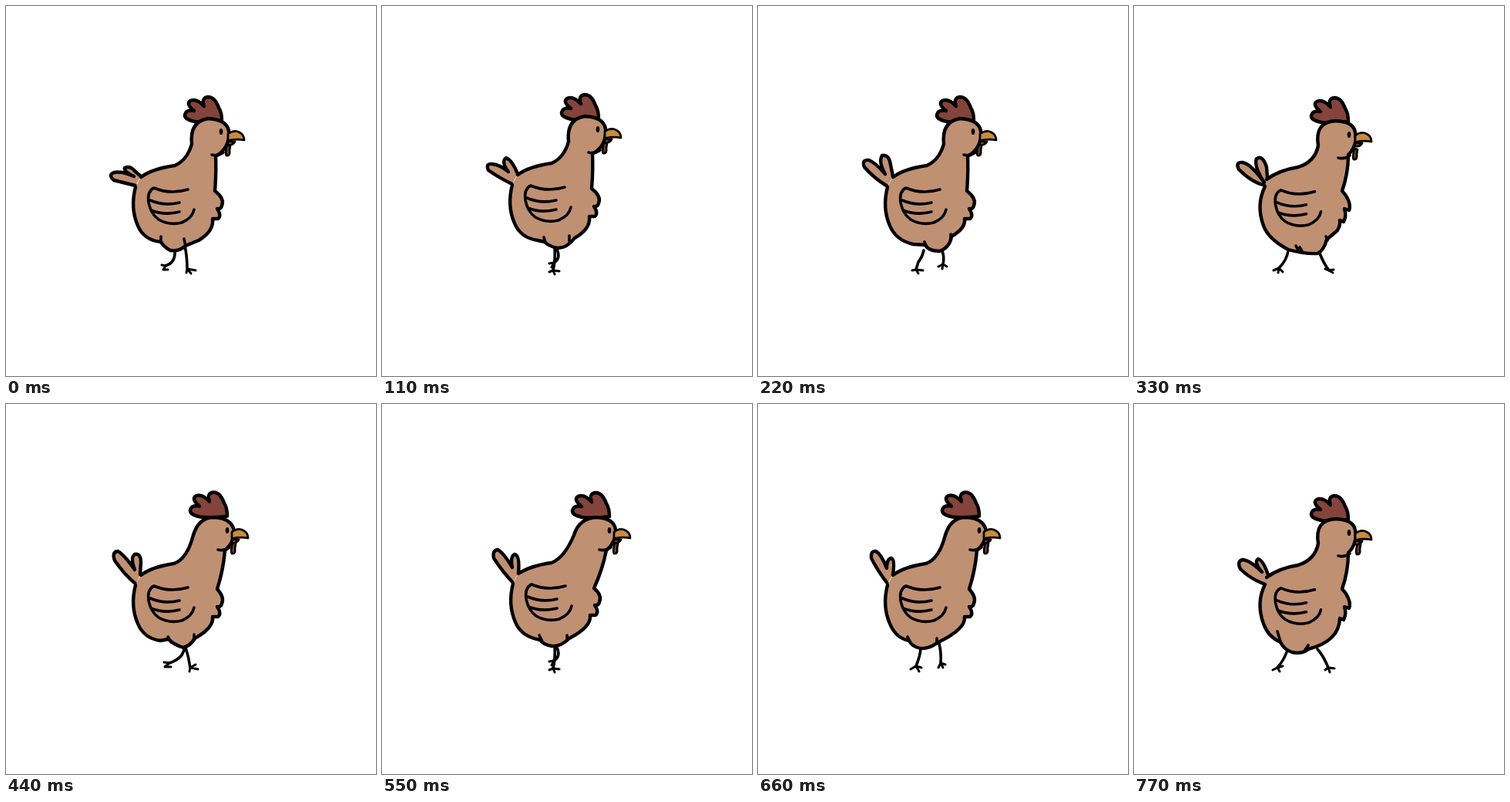
An HTML page that plays this animation: 480 by 480 pixels, repeating every 0.88 s.

```html
<!DOCTYPE html>
<html lang="en">
<head>
<meta charset="utf-8">
<title>Walking hen</title>
<style>
  html, body { margin: 0; width: 100%; height: 100%; overflow: hidden; background: #fff; }
  svg { display: block; width: 100%; height: 100%; }
  path { stroke: #000; stroke-width: 4.4; stroke-linecap: round; stroke-linejoin: round; fill: none; }
  .skin { fill: #c09073; }
  .comb { fill: #84443b; }
  .beak { fill: #ca8b3e; stroke-width: 2.8; }
  .wattle { fill: #86452f; stroke-width: 2.8; }
  .wing, .chin, .ticks, .leg { stroke-width: 3.6; }
  .toes { stroke-width: 3; }
  .pose { visibility: hidden; animation: show 880ms step-end infinite; }
  @keyframes show {
    0% { visibility: visible; }
    12.5%, 100% { visibility: hidden; }
  }
</style>
</head>
<body>
<svg id="stage" viewBox="0 0 480 480"></svg>
<script>
const path = (cls, d, x = 0, y = 0) =>
  `<path class="${cls}" d="${d}" transform="translate(${x} ${y})"/>`;

// Back, neck and head outlines, with offsets for the parts of the face.
const heads = {
  back: {
    line: 'M175 222Q190 211 219 207Q235 200 241 179Q238 150 262 146Q286 147 289 162Q291 184 272 195Q273 215 271 240',
    comb: [0, 0], eye: [0, 0], beak: [0, 0], chin: [0, 0]
  },
  level: {
    line: 'M172 225Q188 213 213 209Q235 202 239 181Q234 150 262 149Q285 150 287 164Q290 181 278 193Q278 217 270 240',
    comb: [-2, 1], eye: [0, 4], beak: [-1, 2], chin: [-2, 4]
  },
  front: {
    line: 'M175 222Q190 211 218 207Q235 201 243 170Q250 147 270 147Q292 148 296 164Q296 180 284 190Q282 215 274 240',
    comb: [7, -3.5], eye: [8, 1], beak: [5, 0], chin: [8, -4]
  },
  reach: {
    line: 'M175 222Q190 212 218 208Q235 201 247 172Q254 150 276 149Q299 150 301 165Q302 181 289 192Q284 217 273 241',
    comb: [13, -1], eye: [14, 3], beak: [11, 2], chin: [13, -2]
  }
};

const trunks = {
  high: {
    chest: 'C279 246 283 252 280 259Q279 264 274 263Q280 272 275 276L268 276',
    rump: 'Q179 304 171 285Q161 262 168 235', wing: [0, 0]
  },
  low: {
    chest: 'C277 247 282 258 279 265L273 263Q276 272 272 280L267 278',
    rump: 'Q174 302 168 285Q158 258 170 234', wing: [-1.5, 2.8]
  }
};

const poses = [
  {
    head: 'back', trunk: 'high', wattle: [0, 0],
    tail: 'M168 233Q152 229 140 226Q132 219 140 216Q150 214 166 221Q152 214 154 210Q161 207 167 214L175 221',
    belly: 'Q270 292 250 304L233 311Q224 319 213 317Q204 312 201 306',
    ticks: 'M231 302L233 312M201 299V307',
    legs: 'M219 318Q220 333 207 337M232 311Q235 325 235 341',
    toes: 'M207 337L202 336M207 337L204 342L210 342M235 341L234 346M235 341L240 347M235 341L246 343'
  },
  {
    head: 'back', trunk: 'high', wattle: [0, 0], shift: [1, -3],
    tail: 'M168 234Q151 226 137 216Q133 207 142 208Q152 209 163 218Q153 205 160 200Q168 203 175 221',
    belly: 'Q270 292 249 304Q238 318 226 317Q214 314 210 309L201 307',
    ticks: 'M242 301V308M209 303L211 310',
    legs: 'M226 314Q233 327 223 333M224 314Q225 330 222 343',
    toes: 'M223 333L217 334M223 333L220 339M222 343L217 345M222 343L224 348M222 343L230 344'
  },
  {
    head: 'back', trunk: 'high', wattle: [-1, 0],
    tail: 'M168 234Q150 223 138 209Q134 199 144 200Q152 203 165 218Q156 202 161 194Q170 192 172 206L175 221',
    belly: 'Q270 288 251 299Q249 313 236 318Q221 318 217 310L201 309',
    ticks: 'M250 296V302M216 306L219 313',
    legs: 'M215 317Q213 326 208 332L205 342M239 318Q242 326 240 335',
    toes: 'M205 342L200 343M205 342L214 343M205 342L208 347M240 335L234 338M240 335L245 338M240 335L239 341'
  },
  {
    head: 'level', trunk: 'low', wattle: [-1, 5],
    tail: 'M171 233Q154 230 136 212Q131 202 141 203Q152 205 169 229Q155 207 159 198Q167 193 172 209L173 223',
    belly: 'Q268 284 264 291Q256 298 250 303Q246 318 238 321Q222 322 200 316',
    ticks: 'M210 311L213 317M215 313L218 318M249 299L251 304',
    legs: 'M200 318Q198 330 188 340M241 321Q246 334 253 343',
    toes: 'M188 340L181 343M188 340L193 345M188 340L187 346M253 343L259 342M253 343L258 346M253 343L248 341'
  },
  {
    head: 'front', trunk: 'high', wattle: [7, 0],
    tail: 'M169 234Q154 222 141 203Q137 192 145 191Q153 195 167 215Q161 199 167 195Q175 193 175 206L174 221',
    belly: 'Q270 290 245 304Q239 314 230 316Q217 312 211 305L200 307',
    ticks: 'M244 299V306M210 302L214 309',
    legs: 'M231 317Q230 330 212 336M233 316Q237 328 239 342',
    toes: 'M212 336L205 335M212 336L206 341L214 341M239 342L238 347M239 342L249 344M239 342L246 338'
  },
  {
    head: 'reach', trunk: 'high', wattle: [13, 2], shift: [2, -2],
    tail: 'M168 234Q154 219 143 202Q141 192 148 191Q155 194 167 214Q164 200 170 197Q177 198 175 221',
    belly: 'Q270 291 241 306Q230 317 218 316Q207 314 203 308',
    ticks: 'M238 302V309M202 302L206 310',
    legs: 'M226 314Q233 327 223 333M224 314Q225 330 222 343',
    toes: 'M223 333L217 334M223 333L220 339M222 343L217 345M222 343L224 348M222 343L230 344'
  },
  {
    head: 'front', trunk: 'high', wattle: [8, 0],
    tail: 'M168 233Q155 216 147 200Q146 190 153 191Q160 195 167 213Q167 201 173 200Q178 202 175 221',
    belly: 'Q270 292 232 310Q222 318 210 317Q199 314 196 307',
    ticks: 'M232 304V311M194 302L198 310',
    legs: 'M211 318Q210 328 205 340M235 311Q238 323 237 336',
    toes: 'M205 340L198 344M205 340L209 347M205 340L212 342M237 336L234 342M237 336L240 342M237 336L243 338'
  },
  {
    head: 'level', trunk: 'low', wattle: [3, 1],
    tail: 'M170 234Q151 227 138 214Q133 204 141 202Q151 203 166 218Q155 205 161 201Q168 203 174 222',
    belly: 'Q266 308 226 318Q218 325 205 322Q195 319 190 309',
    ticks: 'M226 313L222 319M186 295L190 308',
    legs: 'M198 322Q194 333 186 342M238 318Q246 327 252 342',
    toes: 'M186 342L180 345M186 342L189 347M186 342L193 340M252 342L248 345M252 342L254 348M252 342L260 343'
  }
];

function drawHen(pose, index) {
  const head = heads[pose.head], trunk = trunks[pose.trunk];
  const [x, y] = pose.shift || [0, 0];
  return `<g class="pose" style="animation-delay:${(index - 8) * 110}ms">` +
    path('leg', pose.legs) + path('toes', pose.toes) +
    `<g transform="translate(${x} ${y})">` +
    path('skin', pose.tail) +
    path('comb', 'M245 150Q231 147 232 141Q234 134 244 136Q233 127 239 123Q247 119 257 130Q253 119 262 118Q271 118 276 132Q280 138 280 149Q262 152 245 150Z', ...head.comb) +
    path('skin', head.line + trunk.chest + pose.belly + trunk.rump) +
    path('ticks', pose.ticks) +
    path('wing', 'M236 238Q213 245 192 236Q183 240 185 255Q188 270 198 277Q212 285 228 281Q242 275 244 264M187 252Q205 260 225 255M188 265Q206 272 225 267', ...trunk.wing) +
    path('chin', 'M267 193Q275 195 282 190', ...head.chin) +
    path('wattle', 'M287 180Q284 191 286 194Q291 195 290 187L291 181Z', ...pose.wattle) +
    path('beak', 'M288 176H297Q294 181 288 180Z', ...head.beak) +
    path('beak', 'M288 166Q296 160 303 164Q309 167 309 174Q300 172 288 174.5Z', ...head.beak) +
    `<ellipse cx="${279 + head.eye[0]}" cy="${163 + head.eye[1]}" rx="2.3" ry="4"/>` +
    '</g></g>';
}

document.getElementById('stage').innerHTML = poses.map(drawHen).join('');
</script>
</body>
</html>
```
